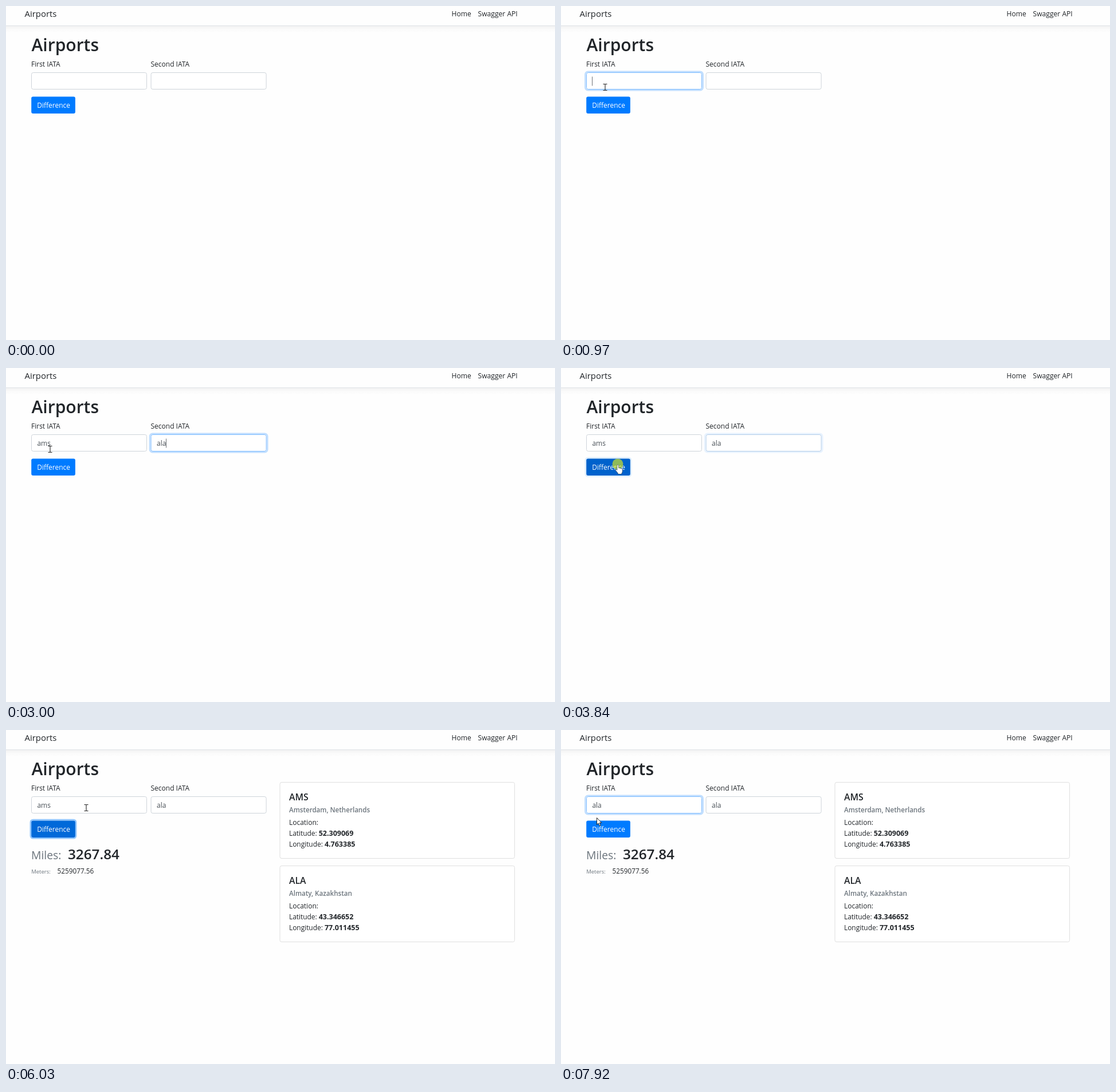
Recreate the animation shown at these times as an HTML page. Size 958 by 584 pixels, loop 7.99 s.

```html
<!DOCTYPE html>
<html lang="en">
<head>
<meta charset="utf-8">
<title>Airports</title>
<style>
  html, body { margin: 0; width: 100%; height: 100%; overflow: hidden; background: #fefefe; }
  svg { display: block; width: 958px; height: 584px; }
  text { font-family: "Open Sans", "Noto Sans", sans-serif; font-size: 12px; fill: #212529; white-space: pre; }
  .muted { fill: #6c757d; }
  .semi { font-weight: 600; }
  .bold { font-weight: 700; font-size: 12.5px; }
  .value { fill: #495057; }
</style>
</head>
<body>
<svg id="stage" viewBox="0 0 958 584">
  <defs>
    <linearGradient id="shade" x1="0" y1="0" x2="0" y2="1">
      <stop offset="0" stop-opacity=".045"/>
      <stop offset=".5" stop-opacity=".015"/>
      <stop offset="1" stop-opacity="0"/>
    </linearGradient>
  </defs>
  <rect width="958" height="584" fill="#fefefe"/>
  <rect y="35" width="958" height="12" fill="url(#shade)"/>
  <rect y="34" width="958" height="1" fill="#dee2e6"/>
</svg>
<script>
const LOOP = 7990;
const stage = document.getElementById('stage');

function add(parent, tag, attrs, content) {
  const el = document.createElementNS('http://www.w3.org/2000/svg', tag);
  set(el, attrs);
  if (content) el.textContent = content;
  parent.appendChild(el);
  return el;
}
function set(el, attrs) {
  for (const name in attrs) el.setAttribute(name, attrs[name]);
}
function label(parent, x, y, content, size = 12, cls = '') {
  return add(parent, 'text', { x, y, class: cls, style: `font-size:${size}px` }, content);
}
function box(parent, x, y, width, height, attrs) {
  return add(parent, 'rect', { x, y, width, height, rx: 3, ...attrs });
}
const clamp = v => Math.max(0, Math.min(1, v));
const lerp = (a, b, k) => a + (b - a) * k;
const mix = (a, b, k) => `rgb(${a.map((v, i) => Math.round(lerp(v, b[i], k)))})`;
const within = (t, a, b) => t >= a && t < b;
// CSS-like 150 ms focus transition
const ease = (t, start) => { const k = clamp((t - start) / 150); return k * k * (3 - 2 * k); };
const latest = (list, t) => list.reduce((text, [at, next]) => t >= at ? next : text, '');

// Static page
label(stage, 32.6, 19, 'Airports', 14.9);
label(stage, 777.5, 17.5, 'Home', 12.1);
label(stage, 823.5, 17.5, 'Swagger API', 12.1);
label(stage, 44.5, 79, 'Airports', 30, 'semi');
label(stage, 44, 105.5, 'First IATA');
label(stage, 252.5, 105.5, 'Second IATA');

// Form
function makeField(x) {
  const ring = box(stage, x - 1.6, 114.9, 205.2, 32.2, {
    fill: 'none', stroke: '#007bff', 'stroke-opacity': .25, 'stroke-width': 2.6, rx: 4.5 });
  const frame = box(stage, x + .5, 116.5, 201, 29, { fill: '#fff' });
  const mark = add(stage, 'rect', { y: 123, height: 17, fill: '#0078d7' });
  const text = label(stage, x + 10.4, 136.3, '', 12, 'value');
  const plain = add(text, 'tspan', {});
  const picked = add(text, 'tspan', { fill: '#fff' });
  const caret = add(stage, 'rect', { y: 123.5, width: 1, height: 16, fill: '#6d7277' });
  return { x: x + 10.4, ring, frame, mark, text, plain, picked, caret };
}
function drawField(field, value, focus, caretOn, selectFrom = value.length) {
  set(field.ring, { opacity: focus });
  set(field.frame, { stroke: mix([206, 212, 218], [128, 189, 255], focus) });
  field.plain.textContent = value.slice(0, selectFrom);
  field.picked.textContent = value.slice(selectFrom);
  const end = value ? field.text.getComputedTextLength() : 0;
  const start = selectFrom ? field.plain.getComputedTextLength() : 0;
  set(field.mark, { x: field.x + start, width: selectFrom < value.length ? end - start : 0 });
  set(field.caret, { x: Math.round(field.x + end), opacity: caretOn ? 1 : 0 });
}
const first = makeField(44);
const second = makeField(252.6);

const buttonRing = box(stage, 42.9, 157, 79.2, 32.2, {
  fill: 'none', stroke: '#268fff', 'stroke-opacity': .5, 'stroke-width': 2.6, rx: 4.2 });
const button = box(stage, 44.2, 158.4, 76.7, 29.6);
set(label(stage, 54.3, 178, 'Difference', 11.95), { style: 'font-size:11.95px;fill:#fff' });

// Results
const results = add(stage, 'g', {});
label(results, 44, 225.5, 'Miles:', 19.3, 'muted');
label(results, 108, 225.5, '3267.84', 24.3, 'semi');
label(results, 44.2, 250.5, 'Meters:', 9.5, 'muted');
label(results, 89.6, 251, '5259077.56', 11.75);

function card(y, code, place, latitude, longitude) {
  const g = add(results, 'g', { transform: `translate(478 ${y})` });
  const row = (baseline, name, value) => {
    const text = label(g, 16, baseline, name + ' ', 11.9);
    add(text, 'tspan', { class: 'bold' }, value);
  };
  box(g, 0, .5, 409.5, 133, { fill: '#fff', stroke: '#dfdfdf' });
  label(g, 16, 32.2, code, 15.8, 'semi');
  label(g, 16, 52.6, place, 11.6, 'semi muted');
  label(g, 16, 75, 'Location:');
  row(94, 'Latitude:', latitude);
  row(112.7, 'Longitude:', longitude);
}
card(91, 'AMS', 'Amsterdam, Netherlands', '52.309069', '4.763385');
card(237, 'ALA', 'Almaty, Kazakhstan', '43.346652', '77.011455');

// Pointer, each shape drawn around its hot spot
const halo = add(stage, 'circle', { r: 9.5, fill: '#ff0' });
const pointer = add(stage, 'g', {});
const shapes = {
  arrow: add(pointer, 'path', {
    d: 'M.5 .5V12.5L3.2 10L5.2 14.6L7.2 13.8L5.2 9.3H8.8Z',
    fill: '#fff', stroke: '#111', 'stroke-width': .9 }),
  beam: add(pointer, 'path', {
    d: 'M-3.5 -5.5H-1L0 -5L1 -5.5H3.5M0 -5V5M-3.5 5.5H-1L0 5L1 5.5H3.5',
    fill: 'none', stroke: '#222', 'stroke-width': 1.1 }),
  hand: add(pointer, 'path', {
    d: 'M-1 2Q.3 0 1.6 2V7Q3 6 4 7.4Q5.3 6.6 6.2 8Q8 7.4 8.2 9.4V13Q8 15 6.8 16V17.5H.4V16L-4 10.5Q-3.6 8.2 -1 10.4Z',
    fill: '#fff', stroke: '#234', 'stroke-width': .6 })
};

// Stretches in which the picture advances in even steps: start, end, count
const bursts = [
  [430, 970, 8], [2040, 2200, 3], [3530, 4070, 8],
  [4240, 4400, 3], [5720, 6500, 11], [7750, 7920, 3]
];
function stepped(t) {
  for (const [a, b, n] of bursts) {
    if (!within(t, a, b)) continue;
    const step = (b - a) / (n - 1);
    return a + Math.floor((t - a) / step + 1e-6) * step;
  }
  return t;
}

// Pointer path: time, x, y
const path = [
  [120, 54, 418], [200, 54, 418], [430, 80, 173], [660, 77, 142],
  [3455, 77, 142], [3755, 99, 168], [4160, 99, 168], [4400, 218, 204],
  [5640, 218, 204], [5798, 274, 168], [5954, 140, 136], [6110, 78, 131],
  [6188, 76, 131], [6266, 54, 131], [6344, 18, 131], [6422, 2, 131],
  [7665, 2, 131], [7920, 62, 153]
];
function pointerAt(t) {
  const i = path.findIndex(p => p[0] > t);
  if (i < 0) return path[path.length - 1].slice(1);
  if (i === 0) return path[0].slice(1);
  const [a, b] = [path[i - 1], path[i]];
  const k = (t - a[0]) / (b[0] - a[0]);
  return [lerp(a[1], b[1], k), lerp(a[2], b[2], k)];
}
// Mouse button: pressed, released
const presses = [[650, 740], [3755, 3880], [6100, 6380]];
const haloAt = t => presses.reduce((alpha, [down, up]) =>
  t >= down ? .56 * (1 - clamp((t - up) / 110)) : alpha, 0);

const firstText = [[1350, 'a'], [1580, 'am'], [1750, 'ams'], [6950, 'a'], [7120, 'al'], [7270, 'ala']];
const secondText = [[2600, 'a'], [2830, 'al'], [3000, 'ala']];

function render(now) {
  const t = stepped(now);
  const [x, y] = pointerAt(t);
  const overButton = t >= 430 && x > 44 && x < 121 && y > 158 && y < 188;
  const overField = y > 116 && y < 146 && (x > 44 && x < 247 || x > 253 && x < 455);
  const kind = overButton ? 'hand' : overField ? 'beam' : 'arrow';

  const selectFrom = within(t, 6320, 6950) ? 0 : within(t, 6250, 6320) ? 2 : undefined;
  drawField(first, latest(firstText, t),
    ease(t, 680) - ease(t, 2020) + ease(t, 6090),
    within(t, 700, 2040) || within(t, 6110, 6250) && false || within(t, 6950, 7750), selectFrom);
  drawField(second, latest(secondText, t),
    ease(t, 2020) - ease(t, 3750), within(t, 2040, 3760));

  const focused = ease(t, 3785) - ease(t, 6090);
  set(buttonRing, { opacity: focused });
  set(button, { fill: within(t, 3755, 3880) ? '#0062cc'
    : mix([0, 123, 255], [0, 105, 217], overButton ? 1 : focused) });
  set(results, { visibility: t >= 5030 ? 'visible' : 'hidden' });

  const shown = within(t, 120, 200) || t >= 430;
  set(pointer, { transform: `translate(${x.toFixed(1)} ${y.toFixed(1)})`, opacity: shown ? 1 : 0 });
  for (const name in shapes) set(shapes[name], { opacity: name === kind ? 1 : 0 });
  set(halo, { cx: x, cy: y, opacity: haloAt(t) });
}

const begin = performance.now();
function tick() {
  render((performance.now() - begin) % LOOP);
  requestAnimationFrame(tick);
}
tick();
</script>
</body>
</html>
```
